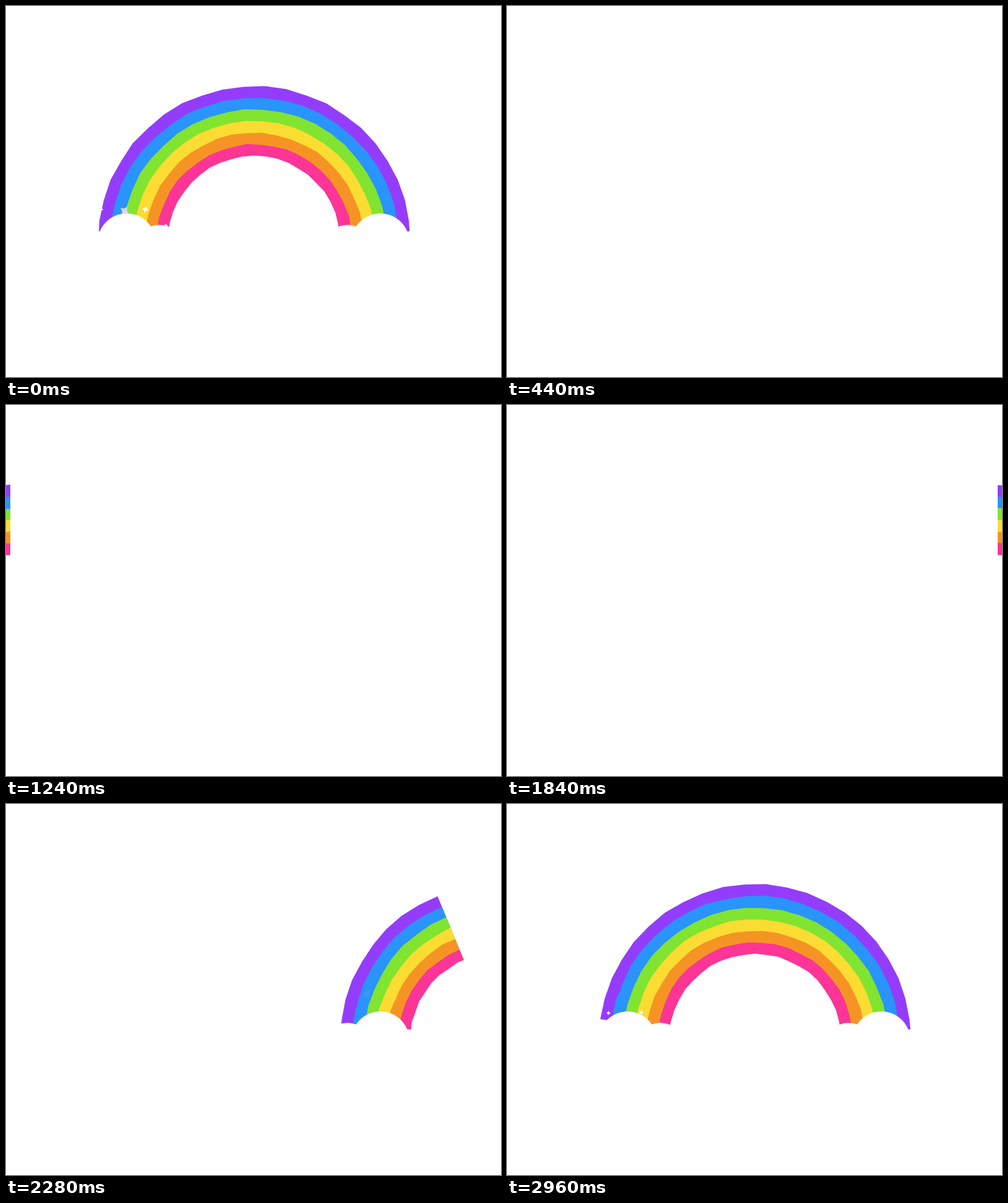
An HTML page with a canvas for the animation above (3000 ms loop, 800 by 600 pixels).

```html
<!DOCTYPE html>
<html lang="en">
<head>
<meta charset="utf-8">
<title>Rainbow hops</title>
<style>
  html, body { margin: 0; width: 100%; height: 100%; overflow: hidden; background: #fff; }
  canvas { display: block; }
</style>
</head>
<body>
<canvas id="stage" width="800" height="600"></canvas>
<script>
const ctx = document.getElementById('stage').getContext('2d');
const LOOP = 3000, STEP = 40;
const CENTER_Y = 382, OUTER = 252, BAND = 18.8;
const COLORS = ['#933dfb', '#2994fb', '#81e430', '#fadc32', '#f59424', '#fc3596'];

// Each arc is complete at its landing time, then its tail follows.
const ARCS = [
  { x: 401, landing: 0 },
  { x: 7, landing: 1000 },
  { x: 793, landing: 2000 }
];
const GROW = 320, LEAVE = 480;

// Sparkle paths are relative to the arc centre.
const SPARKLES = [
  { from: [-237, 338], to: [-267, 313], size: 5, turn: 0.2, color: '#fff' },
  { from: [-209, 346], to: [-210, 307], size: 8, turn: 0.6, color: '#d9d9dc' },
  { from: [-184, 337], to: [-162, 315], size: 5.5, turn: 0.25, color: '#fff' },
  { from: [-154, 355], to: [-124, 355], size: 3.5, turn: 0.1, color: '#fff' }
];

const clamp = v => Math.max(0, Math.min(1, v));
const smooth = v => (v = clamp(v), v * v * (3 - 2 * v));
const lerp = (a, b, k) => a + (b - a) * k;

function noise(n) {
  const s = Math.sin(n * 127.1 + 11.7) * 43758.5453;
  return (s - Math.floor(s)) * 2 - 1;
}

function disc(x, y, r) {
  ctx.beginPath();
  ctx.arc(x, y, r, 0, Math.PI * 2);
  ctx.fill();
}

// A pie slice whose rim is slightly uneven, as if drawn by hand.
function roughSlice(cx, radius, start, end, seed) {
  const count = Math.max(2, Math.ceil((end - start) / 0.14));
  ctx.beginPath();
  ctx.moveTo(cx, CENTER_Y);
  for (let i = 0; i <= count; i++) {
    const a = lerp(start, end, i / count);
    const r = radius + 0.4 + noise(seed + i * 1.37) * 0.9;
    ctx.lineTo(cx + r * Math.cos(a), CENTER_Y - r * Math.sin(a));
  }
  ctx.closePath();
  ctx.fill();
}

function drawArc(cx, age) {
  const head = Math.PI * smooth((age + GROW) / GROW);
  const tail = Math.PI * smooth(age / LEAVE);
  if (head <= tail) return;
  [...COLORS, '#fff'].forEach((color, i) => {
    ctx.fillStyle = color;
    const last = i === COLORS.length;
    // The white core overshoots the ends so no coloured edge shows.
    const pad = last ? 0.05 : 0;
    roughSlice(cx, OUTER - BAND * i, tail - pad, head + pad, head * 31 + tail * 17 + i * 53);
  });
}

function drawSparkles(cx, age) {
  if (age < -40 || age > 300) return;
  const travel = 1 - Math.exp(-(age + 40) / 85);
  const scale = lerp(0.7, 1, clamp((age + 40) / 40));
  for (const s of SPARKLES) {
    ctx.save();
    ctx.translate(cx + lerp(s.from[0], s.to[0], travel), lerp(s.from[1], s.to[1], travel));
    ctx.rotate(s.turn + age / 1500);
    ctx.globalAlpha = clamp((300 - age) / 200);
    ctx.fillStyle = s.color;
    ctx.beginPath();
    for (let i = 0; i < 8; i++) {
      const r = s.size * scale * (i % 2 ? 0.5 : 1);
      ctx.lineTo(r * Math.sin(i * Math.PI / 4), -r * Math.cos(i * Math.PI / 4));
    }
    ctx.fill();
    ctx.restore();
  }
}

function drawClouds() {
  ctx.fillStyle = '#fff';
  ctx.fillRect(0, 364.5, 800, 236);
  for (const place of [x => x, x => 800 - x]) {
    disc(place(195), 382.5, 47);
    disc(place(248), 394, 40);
  }
}

function render(time) {
  const t = Math.floor(time % LOOP / STEP) * STEP;
  ctx.fillStyle = '#fff';
  ctx.fillRect(0, 0, 800, 600);
  for (const { x, landing } of ARCS) {
    const age = (t - landing + GROW + LOOP) % LOOP - GROW;
    if (age > LEAVE) continue;
    drawArc(x, age);
    drawSparkles(x, age);
  }
  drawClouds();
}

const begin = performance.now();
function tick() {
  render(performance.now() - begin);
  requestAnimationFrame(tick);
}
tick();
</script>
</body>
</html>
```
